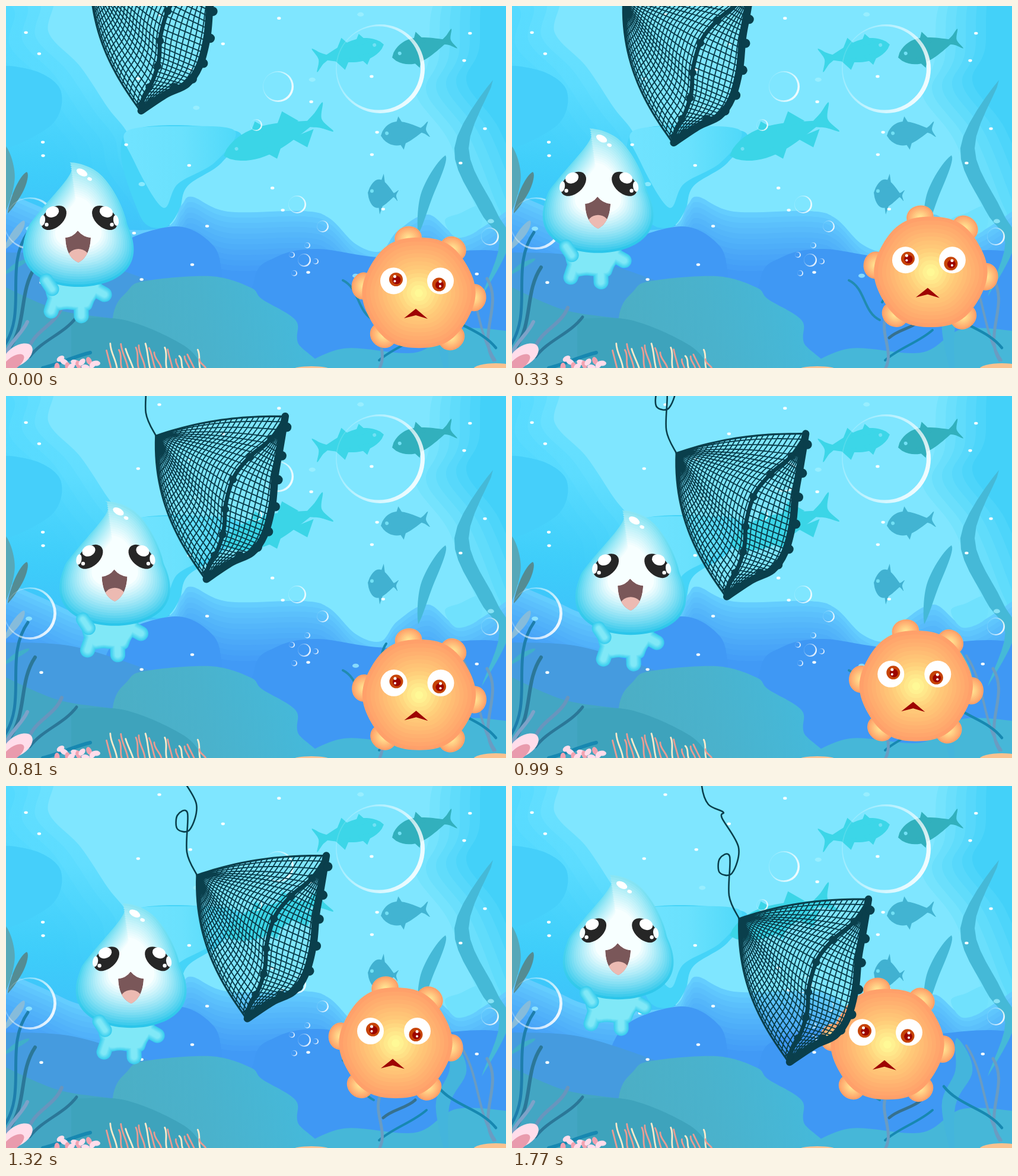
Recreate the animation shown at these times as an HTML page with a canvas. Size 843x611 px, loop 1.8 s.

```html
<!DOCTYPE html>
<html lang="en">
<head>
<meta charset="utf-8">
<title>Under the sea</title>
<style>
html, body { margin: 0; width: 100%; height: 100%; overflow: hidden; background: #7fe6ff; }
canvas { display: block; }
</style>
</head>
<body>
<canvas id="stage" width="843" height="611"></canvas>
<script>
const W = 843, H = 611, LOOP = 1800, TICK = 30, TAU = Math.PI * 2;
const { sin, cos, PI, max, min, floor, hypot, atan2 } = Math;
const stage = document.getElementById('stage').getContext('2d');
const sea = document.createElement('canvas');
sea.width = W;
sea.height = H;
let g = sea.getContext('2d');

// ---------- helpers ----------
const mix = (a, b, t) => a.map((v, i) => v + (b[i] - v) * t);
const rgb = c => `rgb(${c.map(Math.round).join(',')})`;
const range = (n, f) => Array.from({ length: n }, (_, i) => f(i));
const rand = n => { const s = sin(n * 127.1 + 31.7) * 43758.5453; return s - floor(s); };

// Catmull-Rom curve
function curve(p, closed) {
  const n = p.length, path = new Path2D();
  const get = i => closed ? p[(i + n) % n] : p[max(0, min(n - 1, i))];
  path.moveTo(...p[0]);
  for (let i = 0; i < (closed ? n : n - 1); i++) {
    const [a, b, c, d] = [get(i - 1), get(i), get(i + 1), get(i + 2)];
    path.bezierCurveTo(b[0] + (c[0] - a[0]) / 6, b[1] + (c[1] - a[1]) / 6,
      c[0] - (d[0] - b[0]) / 6, c[1] - (d[1] - b[1]) / 6, c[0], c[1]);
  }
  return path;
}
// point on the same curve, u from 0 to 1
function at(p, u) {
  const n = p.length - 1, x = min(u, 0.99999) * n, i = floor(x), t = x - i;
  const a = p[max(0, i - 1)], b = p[i], c = p[i + 1], d = p[min(n, i + 2)];
  return [0, 1].map(k => b[k] + t / 2 * (c[k] - a[k] + t * (2 * a[k] - 5 * b[k] + 4 * c[k] - d[k]
    + t * (3 * (b[k] - c[k]) + d[k] - a[k]))));
}
function fill(path, color) {
  g.fillStyle = color;
  g.fill(path);
}
const blob = (p, color) => fill(curve(p, true), color);
function poly(p, color) {
  const path = new Path2D();
  p.forEach(q => path.lineTo(...q));
  fill(path, color);
}
function stroke(path, color, w) {
  g.strokeStyle = color;
  g.lineWidth = w;
  g.lineCap = g.lineJoin = 'round';
  g.stroke(path);
}
const line = (p, color, w) => stroke(curve(p), color, w);
function oval(x, y, rx, ry, color, rot = 0) {
  g.fillStyle = color;
  g.beginPath();
  g.ellipse(x, y, rx, ry, rot, 0, TAU);
  g.fill();
}
// everything below a crest line
function ridge(p, color, dy = 0) {
  const path = curve(p.map(([x, y]) => [x, y + dy]));
  path.lineTo(p[p.length - 1][0], H + 20);
  path.lineTo(p[0][0], H + 20);
  fill(path, color);
}
function ramp(x0, y0, x1, y1, ...colors) {
  const r = g.createLinearGradient(x0, y0, x1, y1);
  colors.forEach((c, i) => r.addColorStop(i / (colors.length - 1), c));
  return r;
}
function place(draw, x, y, s = 1) {
  g.save();
  g.translate(x, y);
  g.scale(s, s);
  draw();
  g.restore();
}
// path scaled about a centre
const scaled = (path, color, x, y, s) => place(() => {
  g.translate(-x, -y);
  fill(path, color);
}, x, y, s);

// ---------- scenery ----------
function water() {
  g.fillStyle = '#7fe6ff';
  g.fillRect(0, 0, W, H);
  const left = curve([[-40, -30], [75, -20], [72, 45], [125, 102], [172, 172], [205, 215], [217, 264], [268, 345], [250, 420], [-40, 420]], true);
  fill(left, ramp(0, 0, 0, 400, '#6be1ff', '#62deff', '#4bd4fa', '#40c4fa'));
  g.globalAlpha = 0.22;
  for (let i = 1; i < 6; i++)
    place(() => fill(left, ramp(0, 0, 0, 400, '#40d4ff', '#48d5fd', '#39cafa', '#3dbdf9')), -i * 22, i * 7);
  g.globalAlpha = 1;
  blob([[-30, 115], [40, 107], [92, 142], [74, 203], [-30, 240]], '#45cffa');

  const right = curve([[735, -20], [712, 95], [692, 150], [745, 225], [790, 335], [800, 365], [780, 400], [900, 430], [900, -20]], true);
  for (let i = 0; i < 6; i++)
    place(() => fill(right, rgb(mix([116, 227, 253], [67, 209, 249], i / 5))), i * 17, -i * 4);

  // tongue flowing down from the middle
  blob([[203, 215], [388, 211], [364, 264], [306, 304], [292, 345], [266, 374], [225, 352]], '#45d4f8');
  blob([[204, 211], [300, 203], [386, 211], [352, 264], [290, 300], [264, 340], [215, 260]],
    ramp(204, 0, 388, 0, '#70e3ff', '#6ae1fd', '#50d9f9'));

  const deep = [[-20, 305], [60, 340], [140, 372], [265, 375], [296, 336], [314, 322], [374, 347], [500, 346], [545, 358],
    [590, 402], [632, 414], [660, 380], [712, 352], [770, 388], [860, 335]];
  for (let i = 0; i < 12; i++) ridge(deep, rgb(mix([100, 205, 254], [65, 154, 246], (i / 11) ** 0.8)), i * 9);
  blob([[765, 350], [798, 338], [799, 375], [760, 391], [740, 362]], '#70e1fd');
  blob([[180, 500], [185, 410], [285, 372], [350, 405], [366, 465], [380, 540]], '#4099f5');
  blob([[418, 620], [418, 465], [455, 424], [525, 410], [640, 425], [870, 430], [870, 660]], '#3f98f4');
}

function hills() {
  ridge([[-20, 416], [110, 422], [250, 466], [330, 500]], '#459bdf');
  ridge([[-20, 465], [85, 512], [185, 529], [240, 550]], '#43a6c3');
  blob([[180, 526], [205, 481], [235, 464], [345, 456], [412, 475], [432, 495], [488, 530], [492, 568], [518, 630], [180, 650]],
    ramp(180, 580, 490, 500, '#4caec4', '#4ab2cc', '#45b9da'));
  ridge([[110, 528], [200, 530], [300, 573], [338, 618]], '#3ea3bc');
  ridge([[490, 612], [570, 578], [690, 585], [760, 545], [860, 550]], '#46b7d8');
  oval(515, 614, 32, 6, '#f6c397');
  oval(826, 613, 38, 10, '#fbc28f');
}

// silhouette from nose to tail, with fins at the given fractions of its length
function fish(x, y, tx, ty, h, tail, color, fins) {
  const len = hypot(tx - x, ty - y);
  g.save();
  g.translate(x, y);
  g.rotate(atan2(ty - y, tx - x));
  if (tx < x) g.scale(1, -1);
  const rim = range(21, i => {
    const u = i / 20;
    return [u * len * 0.86, h * sin(PI * u ** 0.72) + 3 * u];
  });
  poly([...rim, ...rim.map(([a, b]) => [a, -b]).reverse()], color);
  blob([[len * 0.78, 0], [len * 0.9, -tail * 0.55], [len, -tail], [len * 0.94, 0], [len, tail], [len * 0.9, tail * 0.5]], color);
  fins.forEach((u, i) => {
    const side = i % 2 ? 1 : -1;
    poly([[u - 0.1, 0.5], [u + 0.01, 1.5], [u + 0.12, 0.45]].map(([a, b]) => [a * len, side * b * h]), color);
  });
  oval(len * 0.13, -h * 0.15, 3, 3, '#72e0f4');
  g.restore();
}
function shoal() {
  fish(637, 65, 520, 92, 18, 20, '#3cd6e8', [0.3, 0.28, 0.55, 0.6]);
  fish(651, 87, 756, 55, 20, 17, '#32b0bd', [0.45, 0.35]);
  fish(367, 253, 543, 187, 24, 26, '#3bd5e7', [0.36, 0.43, 0.62, 0.72]);
  fish(632, 219, 713, 208, 19, 13, '#42b4d2', [0.4, 0.42]);
  fish(610, 315, 661, 320, 23, 9, '#41b1d1', [0.45, 0.45]);
}

// tapering leaf along a spine
function leaf(spine, w, color) {
  const edge = side => range(25, i => {
    const u = i / 24, [x, y] = at(spine, u);
    return [x + side * w * sin(PI * u ** 0.8), y];
  });
  poly([...edge(1), ...edge(-1).reverse()], color);
}
// S-shaped stalk
function stalk(x0, y0, x1, y1, sway, color, w) {
  const dx = (x1 - x0) / 3, dy = (y1 - y0) / 3, k = sway / hypot(dx, dy);
  const path = new Path2D();
  path.moveTo(x0, y0);
  path.bezierCurveTo(x0 + dx - dy * k, y0 + dy + dx * k, x1 - dx + dy * k, y1 - dy - dx * k, x1, y1);
  stroke(path, color, w);
}
function plants() {
  leaf([[821, 125], [768, 240], [812, 345], [840, 400], [802, 490]], 14, '#45b9d7');
  leaf([[741, 252], [710, 318], [695, 385]], 11, '#45b9d7');
  leaf([[750, 425], [762, 480], [736, 540], [746, 640]], 15, '#44b5dc');
  const grey = '#6a9cc2', teal = '#1788b1', dark = '#2b7798';
  stalk(766, 438, 825, 598, -14, grey, 4);
  stalk(811, 460, 822, 598, -24, grey, 5);
  stalk(728, 507, 826, 577, 12, teal, 4.5);
  stalk(568, 463, 620, 530, -14, '#218bb0', 4);
  stalk(641, 418, 624, 500, 12, teal, 4);
  stalk(709, 547, 629, 598, -5, teal, 4);
  stalk(690, 530, 636, 560, -5, '#36718e', 5);
  stalk(632, 520, 630, 611, 14, grey, 5);

  leaf([[-2, 235], [6, 290], [0, 345]], 9, '#57a8b8');
  leaf([[35, 280], [20, 315], [3, 350]], 8, '#548c93');
  leaf([[30, 362], [14, 388], [-5, 414]], 8, '#86bcdb');
  leaf([[38, 426], [18, 438], [-5, 455]], 8, '#40afc9');
  stalk(37, 382, -4, 575, 28, '#1e7eac', 5);
  stalk(49, 441, 8, 574, 14, dark, 6);
  stalk(94, 509, 39, 576, -10, '#6895bd', 6);
  stalk(119, 525, 40, 592, -8, dark, 5);
  stalk(142, 585, 62, 611, 2, teal, 6);
  stalk(36, 533, 0, 585, -4, '#7da2c8', 6);
}

function corals() {
  oval(20, 590, 28, 16, '#ffddea', -0.6);
  oval(12, 603, 22, 10, '#e99bad', -0.65);
  for (let i = 0; i < 12; i++)
    oval(86 + i * 6, 611 - 16 * rand(i), 4.5, 7, i % 3 ? '#ffdcea' : '#f1a3b1', i);
  for (let i = 0; i < 18; i++) {
    const x = 172 + i * 9.4, top = 569 + 34 * rand(i + 40) * (0.5 + i / 34);
    stalk(x - 8 + 12 * rand(i + 80), top, x + 6, 615, 5 * sin(i * 2.3), i % 3 === 1 ? '#fae9ca' : '#e99c92', 2.8);
  }
}

// jittered grid of specks
function specks() {
  for (let i = 0; i < 36; i++) {
    const x = (i % 6 + 0.15 + 0.7 * rand(i)) * W / 6, y = (floor(i / 6) + rand(i + 99)) * 79;
    if (i % 5 === 4) oval(x, y, 5.5, 3.6, 'rgba(160,240,255,0.75)');
    else oval(x, y, 3.2, 2.3, '#f7feff');
  }
}

function bubble(x, y, r) {
  const thick = 1.6 + r * 0.075, dx = cos(0.4), dy = sin(0.4);
  g.fillStyle = ramp(x + dx * r, y + dy * r, x - dx * r, y - dy * r,
    'rgba(255,255,255,0.9)', 'rgba(255,255,255,0.55)', 'rgba(255,255,255,0.15)');
  g.beginPath();
  g.arc(x, y, r, 0, TAU);
  g.arc(x - dx * thick * 0.4, y - dy * thick * 0.4, r - thick * 0.6, 0, TAU);
  g.fill('evenodd');
}
const bubbles = () => [[631, 106, 75], [459, 136, 26], [41, 367, 44], [816, 389, 15], [422, 201, 10], [491, 335, 15],
  [534, 372, 10], [503, 429, 11], [482, 420, 5], [522, 431, 5], [486, 451, 5], [508, 404, 5]].forEach(b => bubble(...b));

// ---------- drop ----------
const head = curve(range(60, i => {
  const a = i / 60 * TAU, c = cos(a), up = max(0, c);
  const lean = 13 * sin(2 * Math.acos(up)) - 14 * up ** 12;
  return [122 + lean + 97 * sin(a) * (0.85 - 0.5 * c), 369 - 105 * c];
}), true);
const mouth = new Path2D('M100 391Q113 390 121 379Q130 390 143 391C142 415 133 428 122 433C109 427 101 415 100 391Z');

function eye(side) {
  g.save();
  g.translate(123.5, 0);
  g.scale(side, 1);
  oval(-43, 357.5, 25, 16, '#262626', -0.73);
  oval(-62, 362, 4.5, 9, '#f6feff', 0.15);
  oval(-45.5, 347.5, 11.5, 9, '#fff', -0.4);
  oval(-55, 369, 3.2, 3.2, '#fff');
  g.restore();
}
function drop() {
  const skin = k => rgb(mix([58, 206, 238], [128, 232, 247], k / 6));
  for (let k = 0; k < 7; k++) {
    const w = 25 - k * 2.6;
    line([[150, 478], [166, 487]], skin(k), w);
    line([[86, 485], [76, 515]], skin(k), w);
    line([[126, 485], [127, 523]], skin(k), w);
    blob([[72 + k, 465], [158 - k, 467], [148 - k, 500], [138 - k, 514 - k], [104, 512 - k], [78 + k, 510 - k]], skin(k));
  }
  for (let k = 0; k < 16; k++) {
    const t = k / 15, white = [247, 255, 255];
    const tint = (c, p) => rgb(mix(c, white, t ** p));
    scaled(head, ramp(0, 264, 0, 474, tint([140, 229, 243], 0.9), tint([80, 214, 241], 0.85), tint([42, 197, 234], 0.85)),
      122, 363, 1 - t * 0.58);
  }
  for (let k = 0; k < 7; k++) line([[68, 463], [78, 478]], skin(k), 23 - k * 2.6);
  oval(128, 281, 10, 5.5, '#fff', 0.5);
  oval(141, 292, 4, 2.8, '#fff', 0.4);
  eye(1);
  eye(-1);
  g.save();
  g.clip(mouth);
  fill(mouth, '#7a5759');
  oval(122, 430, 20, 20, '#ecbab2');
  g.restore();
}

// ---------- orange fish ----------
const ball = curve(range(48, i => {
  const a = i / 48 * TAU, r = 94.5 + 1.2 * cos(6 * a);
  return [696 + r * cos(a), 484 + r * sin(a)];
}), true);

function puffer() {
  [-101, -52, 5, 54, 130, 187].forEach(deg => {
    const a = deg * PI / 180;
    for (let k = 0; k < 8; k++) {
      const s = 1 - k * 0.12;
      oval(696 + 94 * cos(a), 484 + 94 * sin(a), 20 * s, 23 * s, rgb(mix([255, 162, 105], [255, 226, 145], k / 7)), a);
    }
  });
  const amber = [255, 205, 122];
  for (let k = 0; k < 14; k++) {
    const t = k / 13;
    const c = t < 0.6 ? mix([255, 160, 106], amber, t / 0.6) : mix(amber, [255, 249, 150], (t - 0.6) / 0.4);
    scaled(ball, rgb(c), 696, 484.5, 1 - k / 14);
  }
  [[653.5, 4, -2.5, -2], [732.5, -2.5, 6, 2]].forEach(([x, dx, dy, glint]) => {
    const ix = x + dx, iy = 464 + dy;
    oval(x, 464, 22.5, 22.5, '#fff');
    oval(ix, iy, 11.5, 11.5, '#c74408');
    oval(ix + 1, iy + 1, 7, 7, '#9c0500');
    oval(ix + glint, iy - 5, 2.5, 2.5, '#fff');
    oval(ix + glint, iy + 3, 2, 2, '#fff');
  });
  poly([[671, 527], [691, 511], [711, 528], [691, 522]], '#9e0303');
}

// ---------- net ----------
const INK = '#0a3f4c', knot = [383, 224];
const inner = [[603, 191], [577, 229], [544, 257], [516, 291], [501, 338], [498, 379], [488, 414], [472, 443], [467, 467]];
const outer = [[601, 191], [592, 245], [584, 290], [579, 342], [566, 391], [545, 421], [510, 438], [468, 466]];

// threads fan out from the knot and belly outwards
function bag(u, v) {
  const [x, y] = mix(knot, at(inner, v), u), belly = 4 * u * (1 - u) ** 1.1;
  return [x - belly * 24 * v * v, y + belly * (8 * v * v - 11 * (1 - v) ** 2)];
}
const gap = (w, v) => mix(at(inner, v), at(outer, v), w);
function trace(path, f) {
  for (let i = 0; i <= 24; i++) path[i ? 'lineTo' : 'moveTo'](...f(i / 24));
  return path;
}
function weave(fn, rows, cols, skip) {
  const path = new Path2D();
  for (let j = 1; j < rows; j++) trace(path, u => fn(u, j / rows));
  for (let i = skip; i < cols; i++) trace(path, v => fn(i / cols, v));
  return path;
}
const meshes = [weave(bag, 26, 24, 4), weave(gap, 36, 8, 1)];
const hems = [0, 1].map(v => trace(new Path2D(), u => bag(u, v)));

function knobs(rope, first, count, push, r) {
  for (let i = 0; i < count; i++) {
    const u = (first + i * (1 - first) / (count - 0.5));
    const a = at(rope, u - 0.01), b = at(rope, u + 0.01), d = hypot(b[0] - a[0], b[1] - a[1]);
    oval((a[0] + b[0]) / 2 - (a[1] - b[1]) / d * push, (a[1] + b[1]) / 2 + (a[0] - b[0]) / d * -push, r, r, INK);
  }
}
function net() {
  meshes.forEach(m => stroke(m, INK, 1.9));
  hems.forEach(h => stroke(h, INK, 3.2));
  line([[319, -60], [320, 0], [331, 31], [356, 44], [354, 54], [382, 104], [371, 147], [350, 146], [350, 123], [367, 119],
    [366, 185], knot], INK, 2.6);
  line(inner, INK, 7);
  line(outer, INK, 12.5);
  knobs(outer, 0.06, 8, 6, 7.8);
  knobs(inner, 0.125, 7, 0, 6.5);
}

// ---------- motion ----------
const dropPath = [[0, 0], [42, -104], [97.6, -53], [55, -117]];
const fishPath = [[0, 0], [9, -39], [18, -1], [-7, 29.5], [-32.6, -51], [-48.6, -49.5], [-64.6, -48]];

function along(keys, span, step) {
  const i = floor(step / span);
  return mix(keys[i], keys[i + 1], step / span - i);
}

[water, hills, shoal, plants, bubbles, corals, specks].forEach(f => f());
g = stage;

const start = performance.now();
function frame() {
  const step = floor(((performance.now() - start) % LOOP) / TICK);
  g.drawImage(sea, 0, 0);
  place(puffer, ...along(fishPath, 10, step));
  place(drop, ...along(dropPath, 20, step));
  place(net, (step - 59) * 4.07, (step - 59) * 4.9);
  requestAnimationFrame(frame);
}
frame();
</script>
</body>
</html>
```
